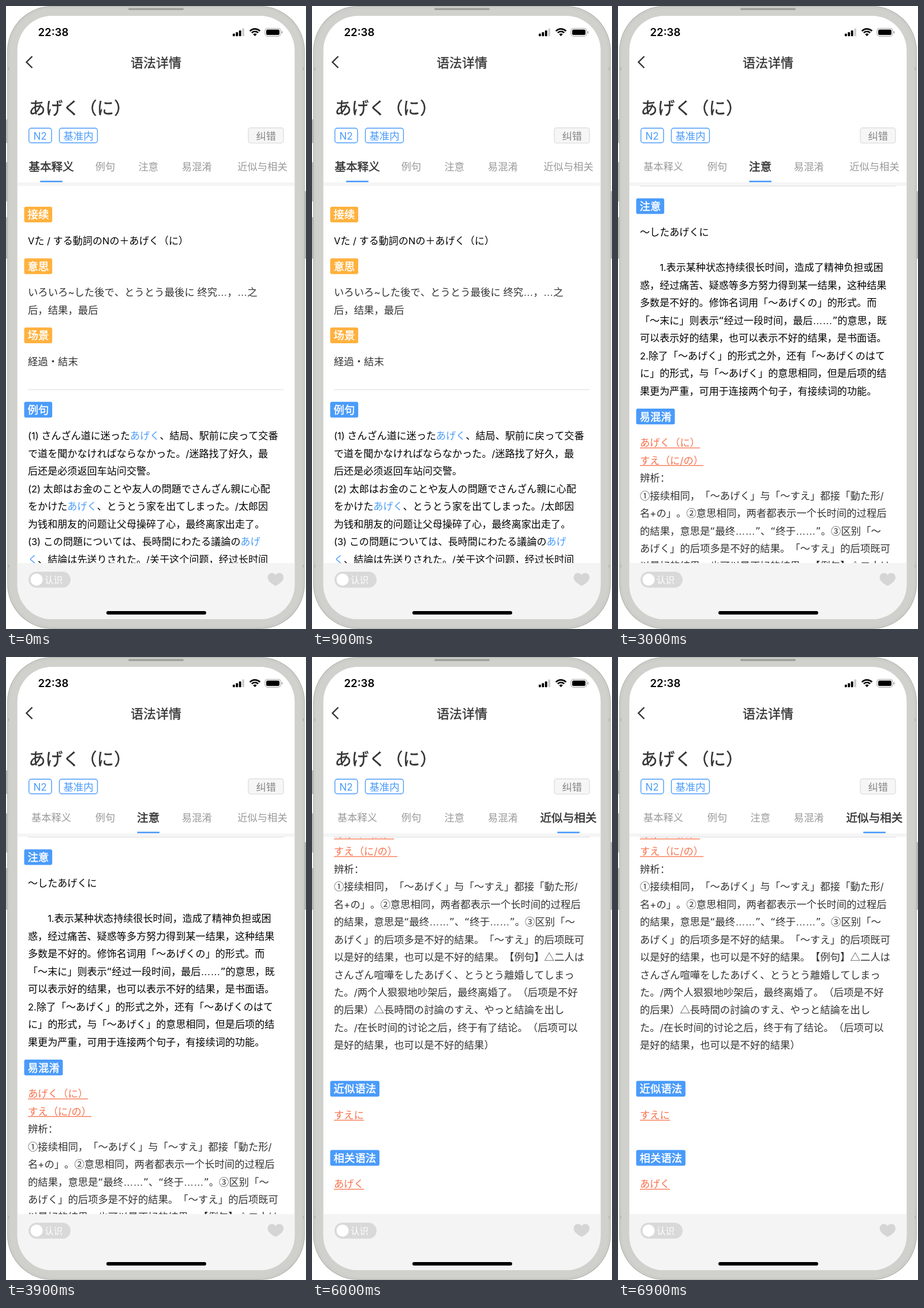
Animation, 520 px wide and 1077 px high, one loop 7.5 s. Source, as an HTML page with a canvas:

```html
<!DOCTYPE html>
<html lang="zh">
<head>
<meta charset="utf-8">
<title>语法详情</title>
<style>
html, body { margin: 0; width: 100%; height: 100%; overflow: hidden; background: #fff; }
canvas { display: block; width: 520px; height: 1077px; }
</style>
</head>
<body>
<canvas id="stage"></canvas>
<script>
const W = 520, H = 1077, STEP = 1500;
const BLUE = '#4a9bfa', ORANGE = '#ffb13d', LINK = '#f7704a', DARK = '#333';
const CJK = '"Noto Sans CJK SC", "Noto Sans CJK JP", sans-serif';
const LATIN = 'Inter, sans-serif';
const LEFT = 38, PITCH = 30.47, TOP = 311, BOTTOM = 963;

const canvas = document.getElementById('stage');
const ratio = window.devicePixelRatio || 1;
canvas.width = W * ratio;
canvas.height = H * ratio;
const ctx = canvas.getContext('2d');
ctx.scale(ratio, ratio);

const tabs = [
  { name: '基本释义', x: 78.5 },
  { name: '例句', x: 172 },
  { name: '注意', x: 246.7 },
  { name: '易混淆', x: 330.8 },
  { name: '近似与相关', x: 444.5 }
];

// y is the centre of the label in the scrolled document; * toggles the highlight
const sections = [
  { label: '接续', y: 360.5, color: ORANGE, lines: ['Vた / する動詞のNの＋あげく（に）'] },
  { label: '意思', y: 449.8, color: ORANGE, soft: true,
    lines: ['いろいろ~した後で、とうとう最後に 终究…，…之', '后，结果，最后'] },
  { label: '场景', y: 569.4, color: ORANGE, soft: true, lines: ['経過・結末'] },
  { label: '例句', y: 697.8, lines: [
    '(1) さんざん道に迷った*あげく*、結局、駅前に戻って交番',
    'で道を聞かなければならなかった。/迷路找了好久，最',
    '后还是必须返回车站问交警。',
    '(2) 太郎はお金のことや友人の問題でさんざん親に心配',
    'をかけた*あげく*、とうとう家を出てしまった。/太郎因',
    '为钱和朋友的问题让父母操碎了心，最终离家出走了。',
    '(3) この問題については、長時間にわたる議論の*あげ*',
    '*く*、結論は先送りされた。/关于这个问题，经过长时间',
    '的讨论，导致结论被推迟了。',
    '(4) 何日間も協議を続けた*あげく*の果ての結論として、',
    '今回は残念ながらわれわれの会としては代表を送らない',
    'ことにした。/经过了好几天的协商，结果是我们很遗憾',
    '这次我们的会上不派代表了。',
    '(5) 山田さんは悩んだ*あげく*、お寺で生活することを決',
    'めた。/山田经过一番苦苦思索之后，决定去寺庙中生活',
    '了。'] },
  { label: '解析', y: 1244.6, lines: [
    '１）「いろいろ~した後で、とうとう残念な結果になっ',
    'た」と言いたいときに使う。２）１回だけのことや軽い'] },
  { label: '注意', y: 1500, lines: [
    '～したあげくに',
    '',
    '　　1.表示某种状态持续很长时间，造成了精神负担或困',
    '惑，经过痛苦、疑惑等多方努力得到某一结果，这种结果',
    '多数是不好的。修饰名词用「～あげくの」的形式。而',
    '「～末に」则表示“经过一段时间，最后……”的意思，既',
    '可以表示好的结果，也可以表示不好的结果，是书面语。',
    '2.除了「～あげく」的形式之外，还有「～あげくのはて',
    'に」的形式，与「～あげく」的意思相同，但是后项的结',
    '果更为严重，可用于连接两个句子，有接续词的功能。'] },
  { label: '易混淆', y: 1863.6, soft: true, links: 2, lines: [
    'あげく（に）',
    'すえ（に/の）',
    '辨析：',
    '①接续相同，「～あげく」与「～すえ」都接「動た形/',
    '名+の」。②意思相同，两者都表示一个长时间的过程后',
    '的結果，意思是“最终……”、“终于……”。③区别「～',
    'あげく」的后项多是不好的結果。「～すえ」的后项既可',
    '以是好的结果，也可以是不好的結果。【例句】△二人は',
    'さんざん喧嘩をしたあげく、とうとう離婚してしまっ',
    'た。/两个人狠狠地吵架后，最终离婚了。（后项是不好',
    '的后果）△長時間の討論のすえ、やっと結論を出し',
    'た。/在长时间的讨论之后，终于有了结论。（后项可以',
    '是好的結果，也可以是不好的結果）'] },
  { label: '近似语法', y: 2349.8, soft: true, links: 1, lines: ['すえに'] },
  { label: '相关语法', y: 2469.2, soft: true, links: 1, lines: ['あげく'] }
];

const scrolls = [0, 351.8, 1154, 1517.8, 1603.4];

function box(x, y, w, h, r, fill, stroke, line = 1) {
  ctx.beginPath();
  ctx.roundRect(x, y, w, h, r);
  if (fill) { ctx.fillStyle = fill; ctx.fill(); }
  if (stroke) { ctx.strokeStyle = stroke; ctx.lineWidth = line; ctx.stroke(); }
}

function fontFor(ch, size) {
  if (/[“”]/.test(ch)) return `${size}px "DejaVu Sans", sans-serif`;
  if (ch === '…') return `${size}px "Liberation Sans", sans-serif`;
  if (ch <= '~') return `${size * 0.96}px ${LATIN}`;
  return `350 ${size}px ${CJK}`;
}

// Sets characters one by one so that full-width punctuation keeps its full cell.
function write(str, x, cy, size, color, weight = 0) {
  const base = cy + size * 0.38;
  let lit = false;
  for (const ch of str) {
    if (ch === '*') { lit = !lit; continue; }
    ctx.font = fontFor(ch, size);
    ctx.fillStyle = lit ? BLUE : color;
    ctx.fillText(ch, x, base);
    if (weight) {
      ctx.strokeStyle = color;
      ctx.lineWidth = weight;
      ctx.strokeText(ch, x, base);
    }
    x += ctx.measureText(ch).width;
  }
  return x;
}

const writeMid = (str, cx, cy, size, color, weight) =>
  write(str, cx - str.length * size / 2, cy, size, color, weight);

function drawPhone() {
  ctx.fillStyle = '#fff';
  ctx.fillRect(0, 0, W, H);
  for (const [y, h] of [[196, 41], [270, 68], [365, 72]]) box(0, y, 4, h, 1, '#b9bab5');
  box(516, 320, 4, 117, 1, '#b9bab5');
  box(2, 0, 516, H, 78, '#b8b9b4');
  box(3.5, 1.5, 513, H - 3, 76.5, '#d0d1cc');
  box(6, 4, 508, H - 8, 74, null, '#c8c9c4');
  ctx.fillStyle = '#bcbdb8';
  for (const y of [106, 966]) {
    ctx.fillRect(2, y, 4, 5);
    ctx.fillRect(514, y, 4, 5);
  }
  box(212, 3.5, 96, 3.5, 2, '#9fa09c');
  box(19.7, 17, 480.6, 1043, 60, '#fff');
}

function drawStatus() {
  ctx.font = `600 18.6px ${LATIN}`;
  ctx.fillStyle = '#000';
  ctx.fillText('22:38', 55.5, 52.3);
  [4.5, 7, 10, 13.5].forEach((h, i) =>
    box(393 + i * 5.4, 52.3 - h, 3.8, h, 1, i < 3 ? '#000' : '#ccc'));
  ctx.strokeStyle = '#000';
  ctx.lineWidth = 2.7;
  for (const r of [12, 7.6]) {
    ctx.beginPath();
    ctx.arc(431.5, 51.6, r, -Math.PI * 0.76, -Math.PI * 0.24);
    ctx.stroke();
  }
  ctx.fillStyle = '#000';
  ctx.beginPath();
  ctx.moveTo(431.5, 52.3);
  ctx.arc(431.5, 51.8, 4.4, -Math.PI * 0.76, -Math.PI * 0.24);
  ctx.fill();
  box(449, 38.7, 27, 13.4, 4.2, null, '#a0a0a0', 1.1);
  box(451, 40.7, 23, 9.4, 2.6, '#000');
  box(477.6, 43.2, 1.6, 4.4, 1, '#a0a0a0');
}

function drawHeader(active) {
  ctx.strokeStyle = DARK;
  ctx.lineWidth = 2.4;
  ctx.beginPath();
  ctx.moveTo(45.5, 87);
  ctx.lineTo(35.5, 97);
  ctx.lineTo(45.5, 107);
  ctx.stroke();
  writeMid('语法详情', 260, 97.3, 22, DARK, 0.35);
  write('あげく（に）', 39.2, 176, 29.6, DARK, 0.45);

  box(39.7, 211.2, 39.3, 25.3, 4, null, BLUE, 1.4);
  write('N2', 47.5, 224, 17.8, BLUE);
  box(92.5, 211.2, 66, 25.3, 4, null, BLUE, 1.4);
  writeMid('基准内', 125.5, 224, 17.4, BLUE);
  box(420, 210.7, 61, 26.3, 4, '#f6f6f6', '#dadada', 1.2);
  writeMid('纠错', 450.7, 224, 17.3, '#858585');

  tabs.forEach(({ name, x }, i) => {
    if (i === active) writeMid(name, x, 277.5, 19.6, DARK, 0.5);
    else writeMid(name, x, 277.5, 17.3, '#999');
  });
  ctx.fillStyle = BLUE;
  ctx.fillRect(tabs[active].x - 19.3, 302, 38.6, 2.6);
  ctx.fillStyle = '#f5f5f5';
  ctx.fillRect(20, 305, 480, 6);
}

function rule(y) {
  ctx.fillStyle = '#e2e2e2';
  ctx.fillRect(LEFT, y, 443, 1.2);
}

function drawSection({ label, y, color = BLUE, soft, links = 0, lines }) {
  box(31.5, y - 13.6, label.length * 18.4 + 11.8, 27.2, 3, color);
  write(label, 37.6, y, 18.4, '#fff', 0.5);
  const size = soft ? 17.36 : 17.1;
  lines.forEach((line, i) => {
    const cy = y + 45 + i * PITCH;
    const linked = i < links;
    const end = write(line, LEFT, cy, size, linked ? LINK : soft ? DARK : '#000');
    if (linked) {
      ctx.fillStyle = LINK;
      ctx.fillRect(LEFT, cy + 8.7, end - LEFT, 1.3);
    }
  });
}

function drawContent(active) {
  const scroll = scrolls[active];
  ctx.save();
  ctx.beginPath();
  ctx.rect(20, TOP, 480, BOTTOM - TOP);
  ctx.clip();
  ctx.translate(0, -scroll);
  for (const s of sections) {
    const end = s.y + 60 + s.lines.length * PITCH;
    if (end > scroll + TOP && s.y - 20 < scroll + BOTTOM) drawSection(s);
  }
  if (active === 0) rule(662.8);
  ctx.restore();
  if (active > 0) rule(310.8);
}

function drawFooter() {
  ctx.save();
  ctx.beginPath();
  ctx.roundRect(19.7, 17, 480.6, 1043, 60);
  ctx.clip();
  ctx.fillStyle = '#f4f4f4';
  ctx.fillRect(19, BOTTOM, 482, 100);
  ctx.restore();
  box(39, 978, 73, 27.5, 13.75, '#d9d9d9');
  box(42.5, 981.2, 21, 21, 10.5, '#fff');
  write('认识', 67, 991.7, 15.6, '#fff');
  ctx.fillStyle = '#d5d5d5';
  ctx.beginPath();
  ctx.moveTo(467.3, 983.5);
  ctx.bezierCurveTo(463, 978, 453.6, 979.5, 453.6, 988);
  ctx.bezierCurveTo(453.6, 994, 460, 998.5, 467.3, 1002.5);
  ctx.bezierCurveTo(474.6, 998.5, 481, 994, 481, 988);
  ctx.bezierCurveTo(481, 979.5, 471.6, 978, 467.3, 983.5);
  ctx.fill();
  box(174, 1046, 173, 6, 3, '#000');
}

let shown = -1;

function tick() {
  const active = Math.floor(performance.now() / STEP) % tabs.length;
  if (active !== shown) {
    shown = active;
    drawPhone();
    drawStatus();
    drawHeader(active);
    drawContent(active);
    drawFooter();
  }
  requestAnimationFrame(tick);
}
tick();
</script>
</body>
</html>
```
